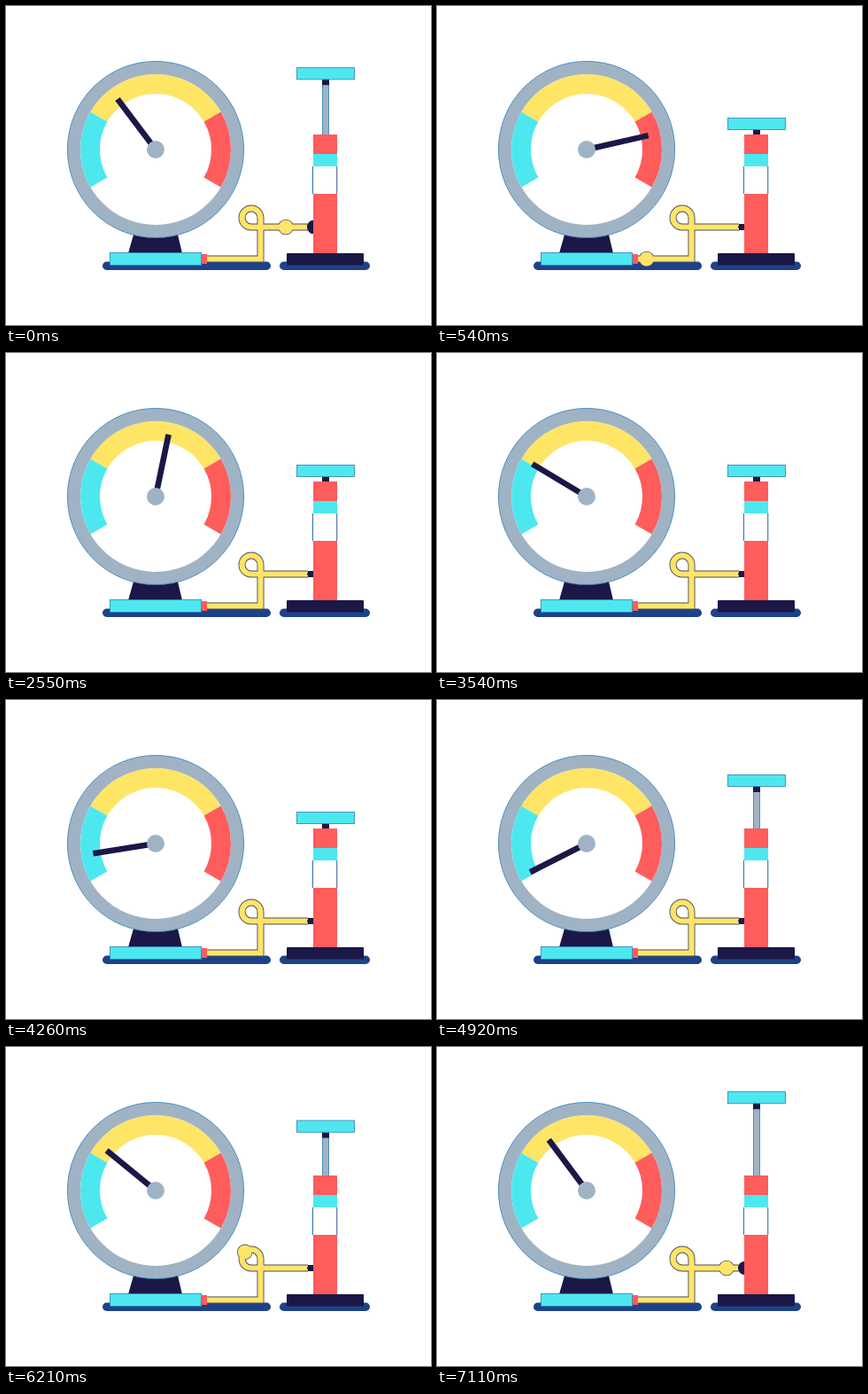
Recreate the animation shown at these times as an HTML page. Size 480x360 px, loop 7.14 s.

```html
<!DOCTYPE html>
<html>
<head>
<meta charset="utf-8">
<style>
html, body { margin: 0; width: 100%; height: 100%; overflow: hidden; background: #fff; }
svg { display: block; width: 480px; height: 360px; }
.teal { fill: #4de8ef; }
.red { fill: #ff5c5c; }
.dark { fill: #1b1746; }
.gray { fill: #a0b3c5; }
.base { fill: #1d4289; }
.edge { stroke: #2f7fb5; stroke-width: .8; }
.hose { fill: none; stroke-linejoin: miter; }
.ring { fill: none; stroke-width: 22; }
</style>
</head>
<body>
<svg viewBox="0 0 480 360">
  <rect class="base" x="109" y="288.5" width="190" height="9.5" rx="4.7"/>
  <rect class="base" x="309" y="288.5" width="102" height="9.5" rx="4.7"/>

  <path class="dark" d="M144 258H194L199 279H138Z"/>
  <circle class="gray edge" cx="169" cy="162" r="99.6"/>
  <circle cx="169" cy="162" r="85" fill="#fff"/>
  <g id="arcs"></g>
  <rect id="needle" class="dark" x="169" y="158.7" width="71.5" height="6.6"/>
  <circle class="gray" cx="169" cy="162" r="10"/>

  <path id="hose" class="hose" stroke="#4a4a66" stroke-width="8" d="M341 249.5H277A10.5 10.5 0 1 1 287.5 239V285.5H227"/>
  <circle class="bulge" r="8.8" fill="#4a4a66"/>
  <use id="inner" href="#hoseFill"/>
  <path id="hoseFill" class="hose" stroke="#ffe566" stroke-width="6.2" d="M341 249.5H277A10.5 10.5 0 1 1 287.5 239V285.5H227"/>
  <circle class="bulge" r="8" fill="#ffe566"/>
  <rect class="teal edge" x="117.4" y="278.4" width="103.2" height="14.2"/>
  <rect class="red" x="221" y="280" width="6" height="11"/>

  <rect class="dark" x="341" y="246" width="7" height="7"/>
  <ellipse id="valve" class="dark" cx="347" cy="249.5" rx="7"/>
  <rect class="gray edge" x="357.4" y="60" width="7.2" id="rod"/>
  <g id="handle">
    <rect class="dark" x="357" y="14" width="8" height="6"/>
    <rect class="teal edge" x="328.4" y=".4" width="65.2" height="13.2"/>
  </g>
  <rect class="red" x="347" y="145" width="27" height="134"/>
  <rect class="teal" x="347" y="167" width="27" height="14"/>
  <rect x="346.5" y="181" width="27" height="31" fill="#fff"/>
  <path d="M346.5 181V212M373.8 181V212" stroke="#2f6fae"/>
  <rect class="dark" x="317" y="279" width="87" height="13.5" rx="1"/>
</svg>
<script>
const LOOP = 7140, START = 680;
const $ = id => document.getElementById(id);
const hose = $('hose'), bulges = document.querySelectorAll('.bulge');

// Each key is [time, value]
const needleKeys = [[680, 0], [5130, 208], [5480, 160], [5800, 182], [6260, 139.5],
  [6440, 152], [6800, 112], [7140, 127], [7820, 0]];
const handleKeys = [[4635, 126], [5135, 57], [5275, 126], [5775, 57], [5930, 126],
  [6410, 57], [6550, 126], [7042, 29], [7262, 126]];
const travelKeys = [[0, 0], [37, 14], [67, 25], [410, 89], [630, 225]];
const pulses = [5165, 5800, 6440, 7073];

const sine = p => (1 - Math.cos(Math.PI * p)) / 2;
const linear = p => p;

function at(keys, t, ease = sine) {
  if (t <= keys[0][0]) return keys[0][1];
  for (let i = 1; i < keys.length; i++) {
    const [t0, a] = keys[i - 1], [t1, b] = keys[i];
    if (t < t1) return a + (b - a) * ease((t - t0) / (t1 - t0));
  }
  return keys[keys.length - 1][1];
}

function polar(deg, r) {
  const a = deg * Math.PI / 180;
  return `${169 + r * Math.cos(a)} ${162 - r * Math.sin(a)}`;
}

$('arcs').innerHTML = [[210, 150, '#4de8ef'], [150, 30, '#ffe566'], [30, -30, '#ff5c5c']]
  .map(([from, to, color]) =>
    `<path class="ring" stroke="${color}" d="M${polar(from, 74)}A74 74 0 0 1 ${polar(to, 74)}"/>`)
  .join('');
$('inner').remove();

function draw(now) {
  let t = now % LOOP;
  if (t < START) t += LOOP;

  $('needle').setAttribute('transform', `rotate(${-at(needleKeys, t)} 169 162)`);

  const y = at(handleKeys, t);
  $('handle').setAttribute('transform', `translate(0 ${y})`);
  $('rod').setAttribute('y', y + 13);
  $('rod').setAttribute('height', 133 - y);

  const pulse = pulses.find(p => t >= p && t < p + 630);
  const age = t - pulse;
  const active = pulse !== undefined;
  const spot = hose.getPointAtLength(active ? at(travelKeys, age, linear) : 0);
  for (const b of bulges) {
    b.setAttribute('cx', spot.x);
    b.setAttribute('cy', spot.y);
    b.style.display = active ? '' : 'none';
  }
  const swell = active && age < 110 ? Math.sin(Math.PI * age / 110) : 0;
  $('valve').setAttribute('ry', 3.5 + 4.5 * swell);
}

let begin;
function frame(now) {
  begin ??= now;
  draw(now - begin);
  requestAnimationFrame(frame);
}
draw(0);
requestAnimationFrame(frame);
</script>
</body>
</html>
```
